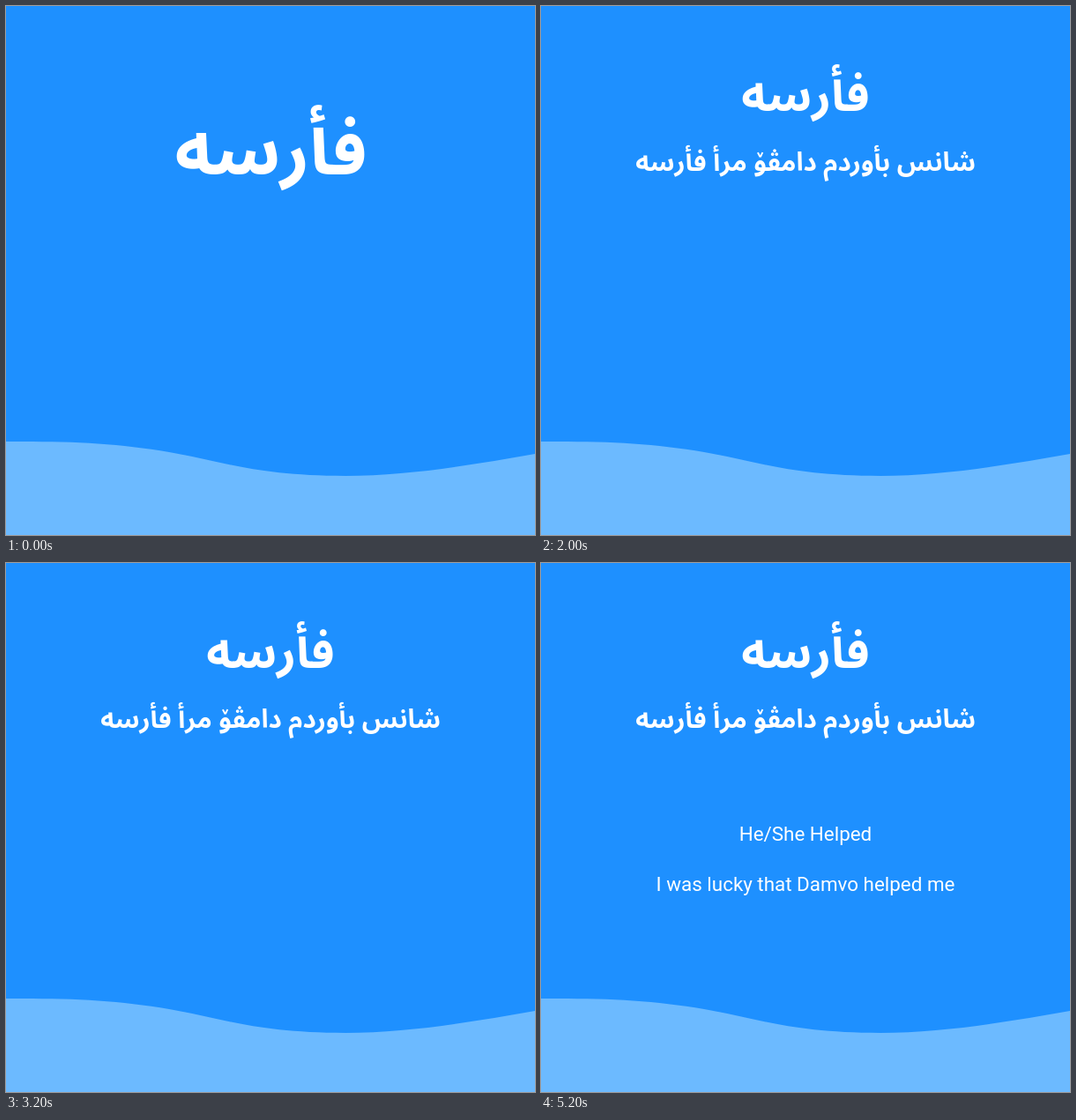
An HTML page that plays this animation: 600 by 600 pixels, repeating every 6 s.

```html
<!DOCTYPE html>
<html lang="en">
<head>
<meta charset="utf-8">
<title>Word card</title>
<style>
  html, body { margin: 0; width: 100%; height: 100%; overflow: hidden; background: #1e90ff; }
  svg { display: block; width: 100vw; height: 100vh; }
  text { fill: #fff; text-anchor: middle; }
  .native {
    font: bold 72px Vazirmatn, Vazir, "Noto Sans Arabic", "DejaVu Sans Condensed", "DejaVu Sans", sans-serif;
    font-stretch: condensed;
    direction: rtl;
  }
  .latin { font: 22.4px Roboto, sans-serif; }
  .title { animation: shrink 6s step-end infinite; }
  .example { animation: second 6s step-end infinite; }
  .meaning { animation: third 6s step-end infinite; }
  @keyframes shrink {
    0% { transform: translate(300.5px, 190.5px); }
    33.3333%, 100% { transform: translate(300px, 118.5px) scale(.6667); }
  }
  @keyframes second {
    0% { visibility: hidden; }
    33.3333%, 100% { visibility: visible; }
  }
  @keyframes third {
    0% { visibility: hidden; }
    66.6667%, 100% { visibility: visible; }
  }
</style>
</head>
<body>
<svg viewBox="0 0 600 600">
  <rect width="600" height="600" fill="#1e90ff"/>
  <path fill="#6cbaff" d="M0 494C70 493.5 125 495.5 185 506S285 533 385 533C457 533 528 520.5 600 508V600H0Z"/>
  <g class="title"><text class="native" id="word">فأرسه</text></g>
  <g class="example"><text class="native" id="sentence" x="300" y="187">شانس بأوردم دامڤۆ مرأ فأرسه</text></g>
  <g class="meaning">
    <text class="latin" x="300" y="315">He/She Helped</text>
    <text class="latin" x="300" y="372">I was lucky that Damvo helped me</text>
  </g>
</svg>
<script>
  // Choose the font size that gives a line its measure.
  function fitSize(id, measure) {
    const line = document.getElementById(id);
    const size = parseFloat(getComputedStyle(line).fontSize);
    line.style.fontSize = size * measure / line.getComputedTextLength() + 'px';
  }
  fitSize('word', 218);
  fitSize('sentence', 386);
</script>
</body>
</html>
```
